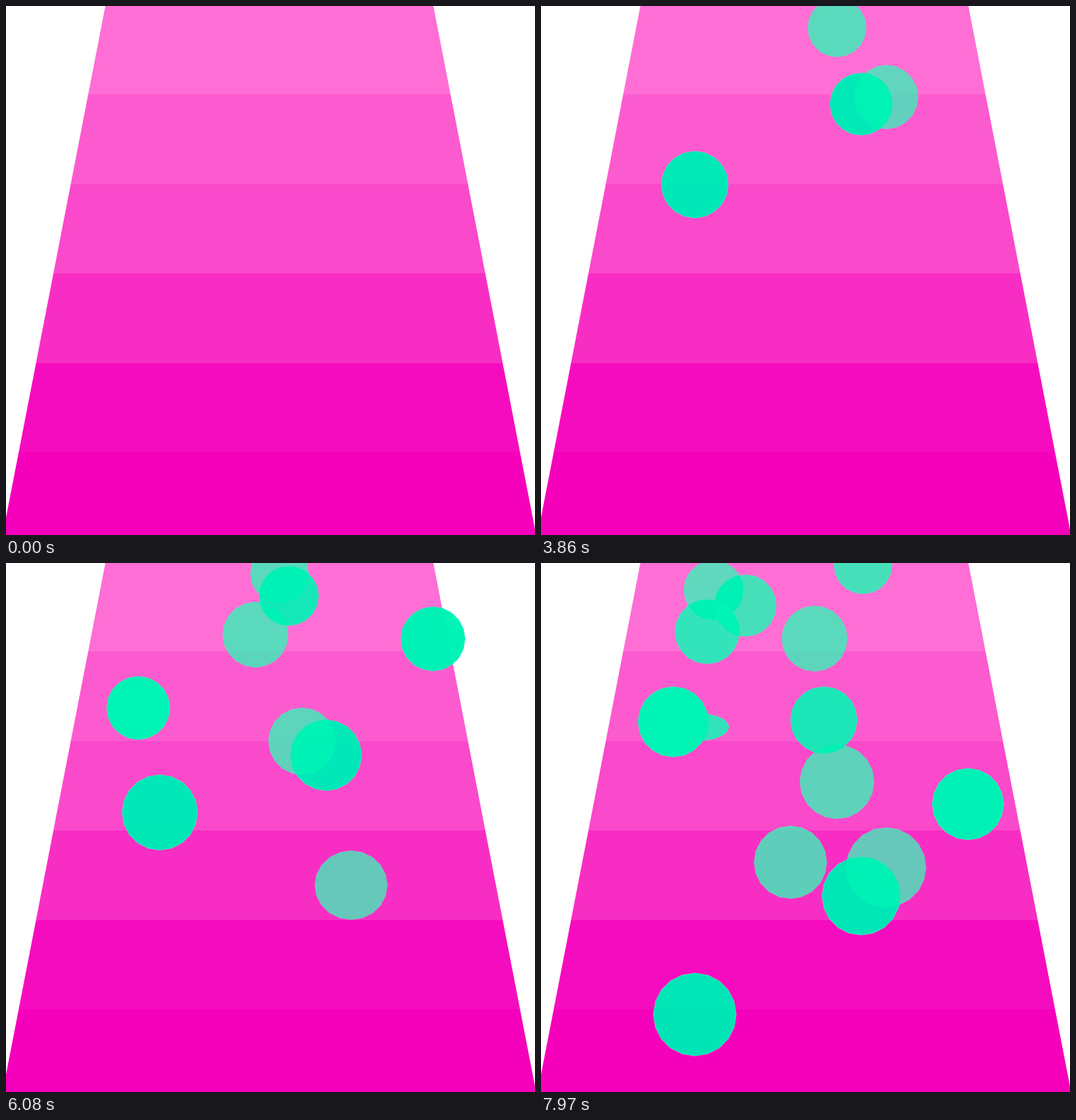
Animation of 748 by 748 pixels, one loop 8 s. Source, as an HTML page with a canvas:

```html
<!DOCTYPE html>
<html lang="en">
<head>
<meta charset="utf-8">
<title>Balls down the stairs</title>
<style>
  html, body { margin: 0; width: 100%; height: 100%; overflow: hidden; background: #fff; }
  canvas { display: block; width: 748px; height: 748px; }
</style>
</head>
<body>
<canvas id="stage" width="748" height="748"></canvas>
<script>
const SIZE = 748, LOOP = 8000;
// Wide-gamut blending keeps the overlaps a saturated green
const ctx = document.getElementById('stage').getContext('2d', { colorSpace: 'display-p3' });

const STEP = 126.4, FIRST_FLOOR = 125.4;
const bands = ['#ff6ed4', '#fd5bcf', '#fa49cb', '#f82ec4', '#f60ebf', '#f500bb'];

const FALL_RATE = 0.042;   // seconds per square root of a fallen pixel
const CONTACT = 0.077;     // seconds spent squashed
const DENT = 50;           // deepest squash in pixels
const BOUNCE = 0.554;      // share of the fall height kept
const DROP = 144;          // fall onto the first floor
const RADIUS = 40.5, GROWTH = 2.72;   // pixels, pixels per second

const FIRST_BEAT = 1440, SECOND_BEAT = 1590;

// Each ball only differs in its lane, moment of release and opacity
const balls = [
  { x: 217.5, start: 1.24, opacity: 0.93 },
  { x: 488, start: 2.03, opacity: 0.76 },
  { x: 452.7, start: 2.412, opacity: 0.93 },
  { x: 418.5, start: 3.46, opacity: 0.785 },
  { x: 352.7, start: 3.86, opacity: 0.785 },
  { x: 603.7, start: 4.16, opacity: 0.98 },
  { x: 187, start: 4.44, opacity: 1 },
  { x: 400, start: 5.4, opacity: 0.91 },
  { x: 386.8, start: 5.715, opacity: 0.785 },
  { x: 235, start: 5.98, opacity: 0.88 },
  { x: 221.2, start: 6.37, opacity: 0.88 },
  { x: 289, start: 6.69, opacity: 0.84 },
  { x: 244, start: 7.26, opacity: 0.77 },
  { x: 455.3, start: 7.635, opacity: 0.84 }
];

const clamp = (v, low, high) => Math.min(high, Math.max(low, v));

// The picture moves on in beats that grow longer as the stage fills up
function snap(ms) {
  if (ms < SECOND_BEAT) return FIRST_BEAT;
  let time = SECOND_BEAT;
  for (let n = 1; ; n++) {
    const gap = clamp(90.1 + 1.6 * (n - 35), 87.33, 118.5);
    if (time + gap > ms) return time;
    time += gap;
  }
}

// Lowest point of a ball and how far it is pressed flat
function pose(age) {
  let floor = FIRST_FLOOR, fall = DROP, rise = 0;
  for (;;) {
    const up = FALL_RATE * Math.sqrt(rise);
    const flight = up + FALL_RATE * Math.sqrt(fall);
    if (age < flight) {
      const fallen = ((age - up) / FALL_RATE) ** 2;
      return { bottom: floor - fall + fallen, dent: 0 };
    }
    age -= flight;
    if (age < CONTACT) {
      return { bottom: floor, dent: DENT * Math.sin(Math.PI * age / CONTACT) };
    }
    age -= CONTACT;
    rise = fall * BOUNCE;
    fall = rise + STEP;
    floor += STEP;
  }
}

function polygon(points) {
  ctx.beginPath();
  for (const [x, y] of points) ctx.lineTo(x, y);
  ctx.fill();
}

function drawStairs() {
  const slope = 0.1943;
  const left = y => 140.5 - slope * y;
  const right = y => 604.3 + slope * y;
  const edge = i => clamp(Math.round(FIRST_FLOOR + STEP * (i - 1)), 0, SIZE);
  bands.forEach((color, i) => {
    const top = edge(i), low = edge(i + 1);
    ctx.fillStyle = color;
    polygon([[left(top), top], [right(top), top], [right(low), low], [left(low), low]]);
  });
}

function drawBall(age, x, opacity) {
  const sides = 20;
  const { bottom, dent } = pose(age);
  const rx = RADIUS + GROWTH * age;
  const ry = rx - dent / 2;
  ctx.globalAlpha = opacity;
  polygon(Array.from({ length: sides }, (_, i) => {
    const a = i * 2 * Math.PI / sides;
    return [x + rx * Math.cos(a), bottom - ry + ry * Math.sin(a)];
  }));
}

function draw(ms) {
  ctx.globalAlpha = 1;
  ctx.fillStyle = '#fff';
  ctx.fillRect(0, 0, SIZE, SIZE);
  drawStairs();
  if (ms < FIRST_BEAT) return;
  const t = snap(ms) / 1000;
  ctx.fillStyle = 'color(display-p3 0.373 0.941 0.725)';
  for (const { x, start, opacity } of balls) {
    if (t > start) drawBall(t - start, x, opacity);
  }
}

const loadTime = performance.now();
function tick() {
  draw((performance.now() - loadTime) % LOOP);
  requestAnimationFrame(tick);
}
tick();
</script>
</body>
</html>
```
